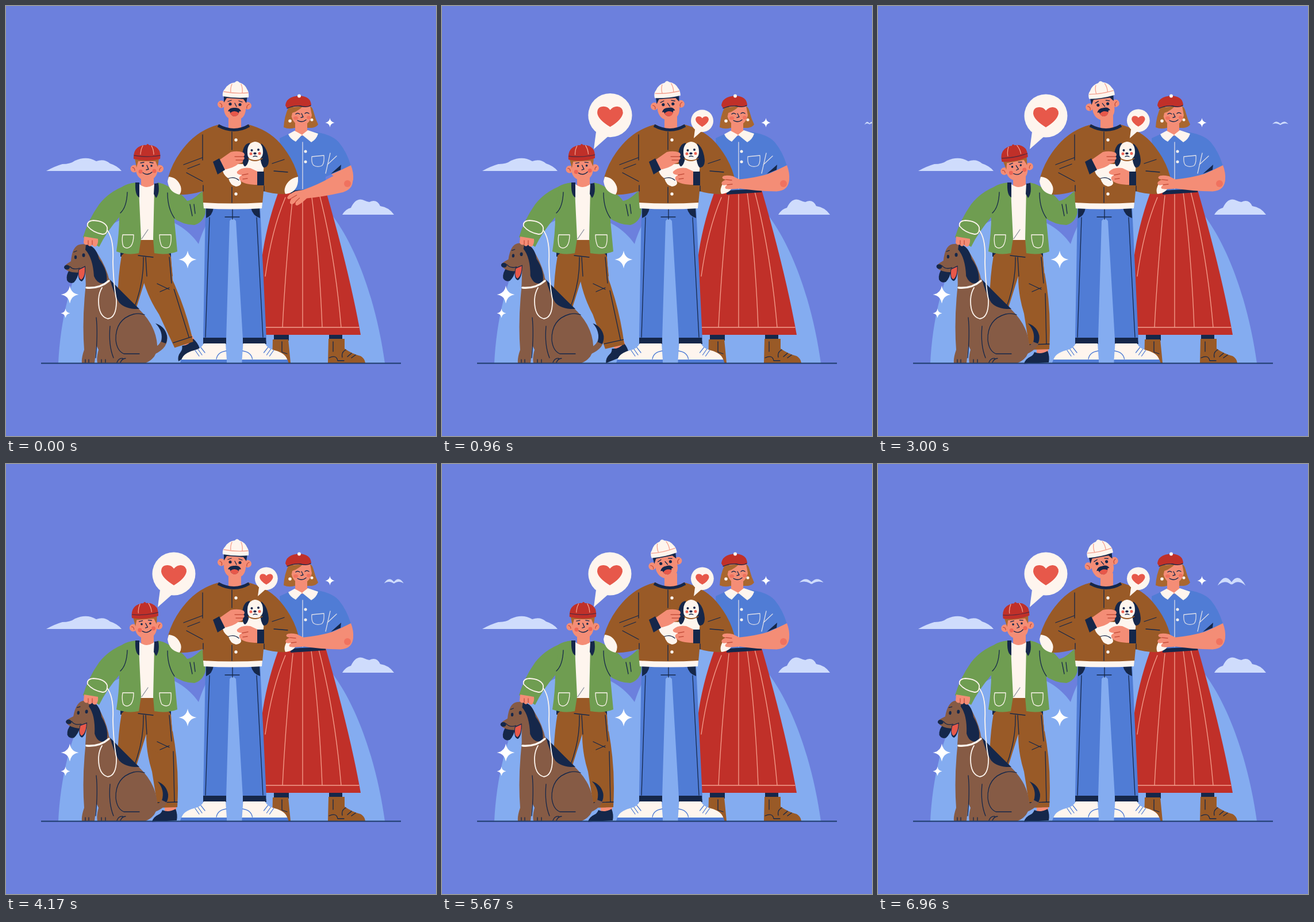
An HTML page that plays this animation: 748 by 748 pixels, repeating every 6990 ms.

```html
<!DOCTYPE html>
<html>
<head>
<meta charset="utf-8">
<style>
html, body { margin: 0; width: 100%; height: 100%; overflow: hidden; background: #6c80dd }
svg { display: block; width: 100vw; height: 100vh }
.navy { fill: #15274a } .skin { fill: #f48d76 } .brown { fill: #995a27 }
.cream { fill: #fef5ee } .blue { fill: #507cd5 } .red { fill: #c03029 } .green { fill: #6f9d51 }
.dog { fill: #865b45 } .hill { fill: #84acf0 } .cloud { fill: #cfdcfc } .hair { fill: #a9672f }
.blush { fill: #ee6656 } .heart { fill: #e7584a }
.l { fill: none; stroke: #15274a; stroke-width: 1.3; stroke-linecap: round; stroke-linejoin: round }
.w { stroke: #fef5ee } .p { stroke: #f4a08e } .b { stroke: #507cd5 } .r { stroke: #c5503d }
</style>
</head>
<body>
<svg viewBox="0 0 748 748">
<defs>
  <path id="star" fill="#fff" d="M0-1Q.13-.13 1 0Q.13.13 0 1Q-.13.13-1 0Q-.13-.13 0-1Z"/>
  <g id="bubble">
    <circle class="cream" cx="28" cy="-58" r="37.5"/>
    <path class="cream" d="M4-30L0 0L26-23Z"/>
    <path class="heart" d="M28-38Q7-51 6-62Q6-73 17-73Q24-73 28-67Q33-73 40-73Q50-72 50-62Q48-50 28-38Z"/>
  </g>
  <g id="shoe">
    <path class="cream" d="M344 587H382L384 616H305Q308 604 327 599Q340 596 344 587Z"/>
    <path class="blue" d="M305 615H384V621H303Z"/>
    <path class="l b" d="M329 599L336 609M334 597L341 607M339 594L346 603M383 600Q368 602 366 614"/>
  </g>
</defs>

<path class="hill" d="M91 621C96 520 130 366 238 364C278 364 314 384 335 414C352 360 390 300 460 300C570 300 638 470 659 621Z"/>
<path class="cloud" d="M70 287Q84 279 98 275Q112 275 120 269Q140 260 157 270Q171 265 181 274Q194 278 201 287Z"/>
<path class="cloud" d="M585 363Q591 353 600 351Q608 334 620 337Q627 340 632 341Q645 335 651 348Q666 350 675 363Z"/>
<use href="#star" transform="translate(316 441)scale(15.5)"/>
<use href="#star" transform="translate(111 502)scale(15.5)"/>
<use href="#star" transform="translate(103.500 534.500)scale(8)"/>
<use href="#star" transform="translate(563.500 203)scale(8)"/>
<g id="bird"><path id="wings" class="cloud"/></g>

<!-- woman -->
<path class="navy" d="M466 570H492V582H466ZM562 570H585V582H562Z"/>
<path class="brown" d="M464 580H491L495 621H463ZM561 579H589V596Q602 605 617 609Q624 613 625 621H560Z"/>
<path class="l" d="M562 612Q575 606 577 617H588M591 598Q583 602 585 611M601 604L594 610M608 607L601 612M569 584V601M480 584V602L489 605"/>
<path class="red" d="M473 326Q452 385 445 440L451 572H617Q598 465 556 320Z"/>
<path class="l p" d="M486 333Q462 390 451 470M499 330Q487 440 481 559M516 328V559M531 325Q545 430 550 559M544 323Q572 430 583 559M452 559H614"/>
<path class="hair" d="M492 175Q484 192 483 211Q492 215 502 212L532 212Q540 211 543 206Q538 196 535 184Q533 175 526 172Z"/>
<path class="skin" d="M503 200V222L515 236L531 222L524 216V200Z"/>
<path class="blue" d="M476 230L500 219L515 226L530 218Q566 222 579 237Q593 254 600 278L566 293L556 297L557 321L497 325L480 300Z"/>
<path class="cream" d="M502 217L515 224L504 236Q494 231 491 223ZM525 216L543 222Q540 232 531 237L515 224Z"/>
<path class="skin" d="M495 184Q497 204 512 209Q528 207 532 190L529 174H500Z"/>
<path class="hair" d="M491 177L517 174Q507 184 498 186Q497 195 491 199Z"/>
<path class="red" d="M486 173Q487 158 510 156Q530 157 531 172Q528 178 511 174Q497 174 489 178Z"/>
<circle class="cream" cx="510" cy="156.500" r="3"/>
<path class="l" d="M489 178Q500 173 512 174Q524 177 530 173M504 188Q507 185 511 188M520 187Q523 184 527 187M514 187L517 193L513 194M507 199Q515 204 522 198"/>
<path class="blush" opacity=".7" d="M500 195a4 3 0 1 0 8 0a4 3 0 1 0-8 0M523 194a3.500 3 0 1 0 7 0a3.500 3 0 1 0-7 0"/>
<circle class="cream" cx="494" cy="200" r="2.800"/><circle class="cream" cx="532" cy="198" r="2.500"/>
<path class="l w" stroke-opacity=".8" d="M516 237V318M532 262L553 260Q554 275 549 278Q541 281 535 277Q531 273 532 262ZM556 291L564 256M559 276L575 261"/>
<circle class="cream" cx="521" cy="253" r="2.500"/><circle class="cream" cx="521" cy="271" r="2.500"/>
<path class="navy" d="M495 321L556 318V324L495 328Z"/>

<!-- boy -->
<path class="navy" d="M199 428H287V436H199Z"/>
<path class="brown" d="M201 434L234 404H258L286 434L290 470L244 470L222 540H194Q193 480 201 434Z"/>
<g id="shin">
  <g id="foot">
    <path class="skin" d="M276 592H296V606H276Z"/>
    <path class="navy" d="M272 602Q283 607 295 600Q299 610 297 620L254 622.500Q256 614 265 610Q270 608 272 602Z"/>
  </g>
  <path class="brown" d="M244 465Q243 500 254 535L264 598L298 597Q302 530 290 465Z"/>
  <path class="l" d="M291 500L293 588M264 589L298 588"/>
</g>
<path class="brown" d="M243 436H287L291 492Q266 512 246 492Z"/>
<path class="l" d="M239 437Q240 480 224 522M243 437L245 470M284 437L288 482M230 434L256 437M263 483L284 493M268 497L284 490"/>
<path class="skin" d="M235 295H257V318H235Z"/>
<path class="cream" d="M231 309Q245 321 259 309V407H232Z"/>
<path class="l" stroke-opacity=".5" d="M236 405L247 389"/>
<path class="green" d="M272 309Q304 323 315 339Q325 338 341 322L349 350Q346 376 328 381Q308 381 288 367Z"/>
<path class="green" d="M220 308Q182 319 162 345Q143 372 134 402L162 419Q174 394 198 366Z"/>
<path class="green" d="M226 307Q210 309 203 314L197 365Q197 395 192 427Q212 434 231 430L235 405L231 320ZM264 307Q280 310 287 320Q293 345 293 374L298 427Q280 434 258 430L256 405L258 320Z"/>
<path class="navy" d="M225 307L232 307L232 333Q224 330 225 307ZM258 309L265 308Q268 326 261 334L257 327Z"/>
<path class="l" d="M211 324Q210 350 199 360M281 325Q281 352 293 369M320 345L324 365M327 345L329 361"/>
<path class="l w" d="M203 398H222Q222 412 217 418Q210 424 204 418Q201 410 203 398ZM267 398H287Q288 413 284 419Q278 423 271 418Q267 410 267 398Z"/>
<g id="boyHead">
  <circle class="skin" cx="223" cy="283" r="6.500"/><circle class="skin" cx="267.500" cy="283" r="6.500"/>
  <path class="skin" d="M226 264H264V284Q263 302 245 304Q228 302 226 286Z"/>
  <path class="hair" d="M224 265H266L264 280L260 270H230L227 281Z"/>
  <path class="red" d="M222 266Q221 251 231 245Q239 241 244 242Q246 238 249 242Q261 242 267 252Q269 259 268 266Q245 272 222 266Z"/>
  <path class="l p" d="M238 243Q234 250 234 258M253 243Q257 250 257 258"/>
  <path class="l" stroke-opacity=".6" d="M223 260Q245 264 268 260"/>
  <path class="l" d="M234 273L240 272M250 272L256 273M245 277L248 284L244 285M238 290Q246 296 254 289"/>
  <path class="l r" d="M220 281Q224 281 224 286M270 281Q267 282 267 286"/>
  <circle class="navy" cx="238" cy="278" r="1.800"/><circle class="navy" cx="253" cy="278" r="1.800"/>
  <circle class="blush" cx="234" cy="288" r="3.500"/><circle class="blush" cx="258" cy="287" r="3.500"/>
</g>

<!-- man -->
<path class="blue" d="M347 350H442L453 580H412L400 374Q394 366 389 374L383 580H343Z"/>
<path class="navy" d="M348 351H361Q359 365 348 369ZM426 351H441L442 369Q429 365 426 351ZM343 577H383V588H343ZM412 577H452L453 588H412Z"/>
<path class="l" d="M354 368L347 576M436 368L447 576M381 367H406M394 352V371"/>
<use href="#shoe"/><use href="#shoe" transform="matrix(-1 0 0 1 794.500 0)"/>
<path class="skin" d="M387 190H409V216H387Z"/>
<path class="brown" d="M371 206Q397 222 421 206Q456 215 477 239Q500 266 508 296Q509 320 488 327Q466 328 448 322L446 344H343L342 322Q320 329 303 328Q283 323 282 298Q291 267 313 242Q336 215 371 206Z"/>
<path class="cream" d="M343 342Q395 345 446 342L445 352Q395 355 344 352Z"/>
<path class="cream" d="M283 297Q298 298 304 314Q306 322 302 328Q284 325 281 305ZM508 297Q492 300 486 314Q483 322 486 327Q506 325 508 305Z"/>
<path fill="none" stroke="#15274a" stroke-width="5" d="M369 208Q397 223 423 208"/>
<path class="l" d="M342 224V268M343 312V322M393 219V250M393 315V342M449 313V322M309 276L341 264M316 283L337 275M314 290L342 305M463 274L484 267M466 287L490 289"/>
<circle class="cream" cx="400" cy="233" r="2.700"/><circle class="cream" cx="400" cy="309" r="2.700"/><circle class="cream" cx="400" cy="327" r="2.700"/>
<g id="manHead">
  <circle class="skin" cx="374.500" cy="171" r="6.500"/><circle class="skin" cx="420.500" cy="173.500" r="6.500"/>
  <path class="skin" d="M380 156L418 157L417 181Q415 198 398 199Q381 197 379 180Z"/>
  <path class="navy" d="M379 156H420L418 169L413 162L384 160L379 168Z"/>
  <path class="skin" d="M385 162L413 164V169H384Z"/>
  <path class="cream" d="M377 157Q376 148 381 144Q387 134 398 133Q402 128 406 133Q416 136 420 146Q423 150 422 159Q399 161 377 157Z"/>
  <path class="l p" d="M379 149Q399 153 421 151M393 136Q390 143 391 150M409 136Q412 143 411 151"/>
  <path class="l" d="M386 166L392 164M405 165L411 167M398 169L401 175"/>
  <path class="l r" d="M372 169Q377 171 375 176M423 171Q418 173 419 178"/>
  <circle class="navy" cx="390" cy="170.500" r="2.600"/><circle class="navy" cx="407" cy="171.500" r="2.600"/>
  <path class="navy" d="M389 180H406Q406 191 397 192Q389 190 389 180Z"/>
  <path class="heart" d="M390 186Q397 180 405 186Q403 192 397 192Q392 191 390 186Z"/>
  <path class="navy" d="M386 183Q389 176 398 177Q406 176 409 183Q403 184 398 181Q391 184 386 183Z"/>
</g>

<!-- puppy and hands -->
<path class="cream" d="M377 280Q394 274 412 275Q420 262 426 262H446Q452 284 443 306L408 304Q412 312 400 314Q390 312 387 300Q375 292 377 280Z"/>
<path class="navy" d="M424 238Q412 240 411 260Q411 279 416 279Q422 276 424 258ZM444 239Q455 247 457 268Q457 281 448 281Q443 276 442 260Z"/>
<path class="cream" d="M420 256Q419 238 433 236Q447 237 447 254Q447 267 433 268Q420 268 420 256Z"/>
<path fill="none" stroke="#995a27" stroke-width="2" d="M421 265Q433 273 446 265"/>
<path class="l" d="M387 300Q397 296 405 303M430 262Q433 260 437 262"/>
<circle class="navy" cx="427.500" cy="251" r="2"/><circle class="navy" cx="439" cy="250" r="2"/><ellipse class="navy" cx="433" cy="256.500" rx="2.700" ry="2"/>
<circle class="blush" cx="426" cy="257" r="2.500"/><circle class="blush" cx="441" cy="256.500" r="2.500"/>
<path class="skin" d="M371 268L391 254Q403 251 413 255Q417 259 413 262Q417 265 412 268Q414 272 405 274Q395 283 376 285ZM438 288L425 282Q410 280 402 288Q400 293 411 294Q402 298 408 304Q415 311 438 311Z"/>
<path class="l r" d="M398 262L413 262M400 268L412 268M411 294L421 292M412 301L420 300"/>
<path class="navy" d="M360 271L371 265L381 285L368 293ZM437 288H449V312H437Z"/>

<!-- woman's arm -->
<path class="skin" d="M566 293Q584 285 600 277Q605 290 604 302Q602 313 592 312Z"/>
<g id="arm">
  <g id="hand">
    <path class="skin" d="M518 302L506 296Q492 293 488 297Q486 301 494 302Q484 306 487 310Q488 313 497 311Q490 315 494 318Q502 320 520 317Z"/>
    <path class="l r" d="M494 302L504 303M496 311L505 310"/>
  </g>
  <path class="skin" d="M514 302Q545 299 568 292Q596 284 604 300Q604 321 582 322.500Q548 322 514 317Z"/>
</g>
<path class="navy" d="M565 292L583 276L582 285Z"/>
<circle class="blush" opacity=".7" cx="594" cy="309" r="6"/>

<!-- dog -->
<g id="tail">
  <path class="dog" d="M254 597Q273 588 271 572L280 573Q284 594 258 606Z"/>
  <path class="navy" d="M260 552Q276 557 280 573Q281 581 278 587L270 584Q274 566 260 552Z"/>
</g>
<path class="dog" d="M139 484Q132 545 136 598Q131 612 132 621H154Q156 605 157 590L161 598Q157 612 159 621H243Q264 612 263 590Q261 556 231 527Q200 505 179 474Z"/>
<path class="navy" d="M181 476Q212 508 232 527Q208 528 197 516Q188 502 181 476Z"/>
<path class="l" d="M157 542Q160 570 156 612M181 557Q178 590 187 612M191 581Q190 545 222 536Q232 534 241 537M191 581Q193 600 205 605H232M138 615V620M144 615V620M166 615V620M173 615V620M193 620Q196 612 203 613M199 620Q202 613 208 613"/>
<g id="dogHead">
  <path class="navy" d="M111 458Q104 468 106 477Q110 484 118 481Q125 474 127 460Z"/>
  <path class="dog" d="M113 444Q115 418 128 415Q148 411 160 432Q175 455 180 478Q160 495 139 490L138 462Q120 466 108 461Q101 458 102 452Q106 448 113 444Z"/>
  <path class="navy" d="M126 458L138 452Q139 474 132 479Q124 478 126 458Z"/>
  <path class="heart" d="M127 459L137 454Q138 471 131 476Q125 474 127 459Z"/>
  <path class="navy" d="M139 415Q156 416 162 440Q178 461 175 481Q160 487 153 470Q151 438 138 424Z"/>
  <ellipse class="navy" cx="106" cy="454.500" rx="5" ry="4"/>
  <ellipse class="navy" cx="121" cy="437" rx="2.200" ry="3.200"/><ellipse class="navy" cx="135" cy="433.500" rx="2.500" ry="3.300"/>
  <path class="l" d="M118 428L123 426M111 453Q117 460 128 456"/>
</g>
<path fill="none" stroke="#fef5ee" stroke-width="3.500" stroke-linecap="round" d="M140 490Q163 492 179 478"/>
<path class="skin" d="M136 401L160 405Q161 413 157 418Q152 420 150 415Q146 421 142 415Q138 417 135 412Z"/>
<path class="l r" d="M143 408V415M150 408V415"/>
<path class="l w" style="stroke-width:1.8" d="M142 383Q140 374 152 373Q172 374 176 385Q177 397 168 397Q151 394 142 383M176 390Q188 405 186 445Q187 485 192 510Q193 542 177 544Q161 540 161 513Q161 500 167 490"/>
<path d="M61 621.500H687" stroke="#1d3b6b" stroke-width="1.800"/>

<use id="bigBubble" href="#bubble"/>
<use id="smallBubble" href="#bubble"/>
</svg>
<script>
const LOOP = 6990, $ = id => document.getElementById(id);
const move = (id, value) => $(id).setAttribute('transform', value);
const turn = (id, angle, x, y) => move(id, `rotate(${angle} ${x} ${y})`);
const ease = p => (1 - Math.cos(Math.PI * Math.min(1, Math.max(0, p)))) / 2;
const swing = (t, period) => (1 - Math.cos(2 * Math.PI * t / period)) / 2;

// Damped spring from 0 to 1
function pop(t) {
  const n = t / 162;
  return n < 0 ? 0 : 1 - Math.exp(-.82 * n) * Math.cos(Math.PI * n);
}

const nods = [[0, 0], [2000, 1], [3200, .1], [4450, .85], [5500, .15], [6700, .8], [7900, .1]];
function nod(t) {
  const i = nods.findIndex(k => k[0] > t), [t0, a] = nods[i - 1], [t1, b] = nods[i];
  return a + (b - a) * ease((t - t0) / (t1 - t0));
}

function bird(t) {
  const s = (23 + .0052 * (t - 2040)) / 48;
  const flap = (1 + Math.cos(2 * Math.PI * (t - 6960) / 860)) / 2;
  const tip = 3 + 5 * flap, top = -6 - 3 * flap;
  $('wings').setAttribute('d',
    `M-24 ${tip}Q-12 ${top * 1.7} 0 2Q12 ${top * 1.7} 24 ${tip}Q13 ${top * .2} 4 4Q0 8-4 4Q-13 ${top * .2}-24 ${tip}Z`);
  move('bird', `translate(${720.5 - .02144 * (t - 2040)} 203.5)scale(${s})`);
}

function draw(t) {
  turn('manHead', -19 * swing(t, 4200), 396, 207);
  turn('boyHead', -11 * swing(t, 5400), 245, 303);
  turn('dogHead', 8 * nod(t), 163, 480);
  turn('tail', 6 * nod(t), 260, 600);
  const step = 1 - ease(t / 2500);
  turn('shin', -16 * step, 266, 492);
  move('foot', `translate(${4 * step} ${-6 * step})rotate(${-12 * step} 285 597)`);
  const drop = 1 - ease(t / 800);
  turn('arm', -14 * drop, 590, 306);
  turn('hand', -22 * drop, 516, 309);
  move('bigBubble', `translate(264 249)scale(${pop(t - 150)})`);
  move('smallBubble', `translate(438 230)scale(${.53 * pop(t - 270)})`);
  bird(t);
}

function frame() {
  draw(performance.now() % LOOP);
  requestAnimationFrame(frame);
}
frame();
</script>
</body>
</html>
```
